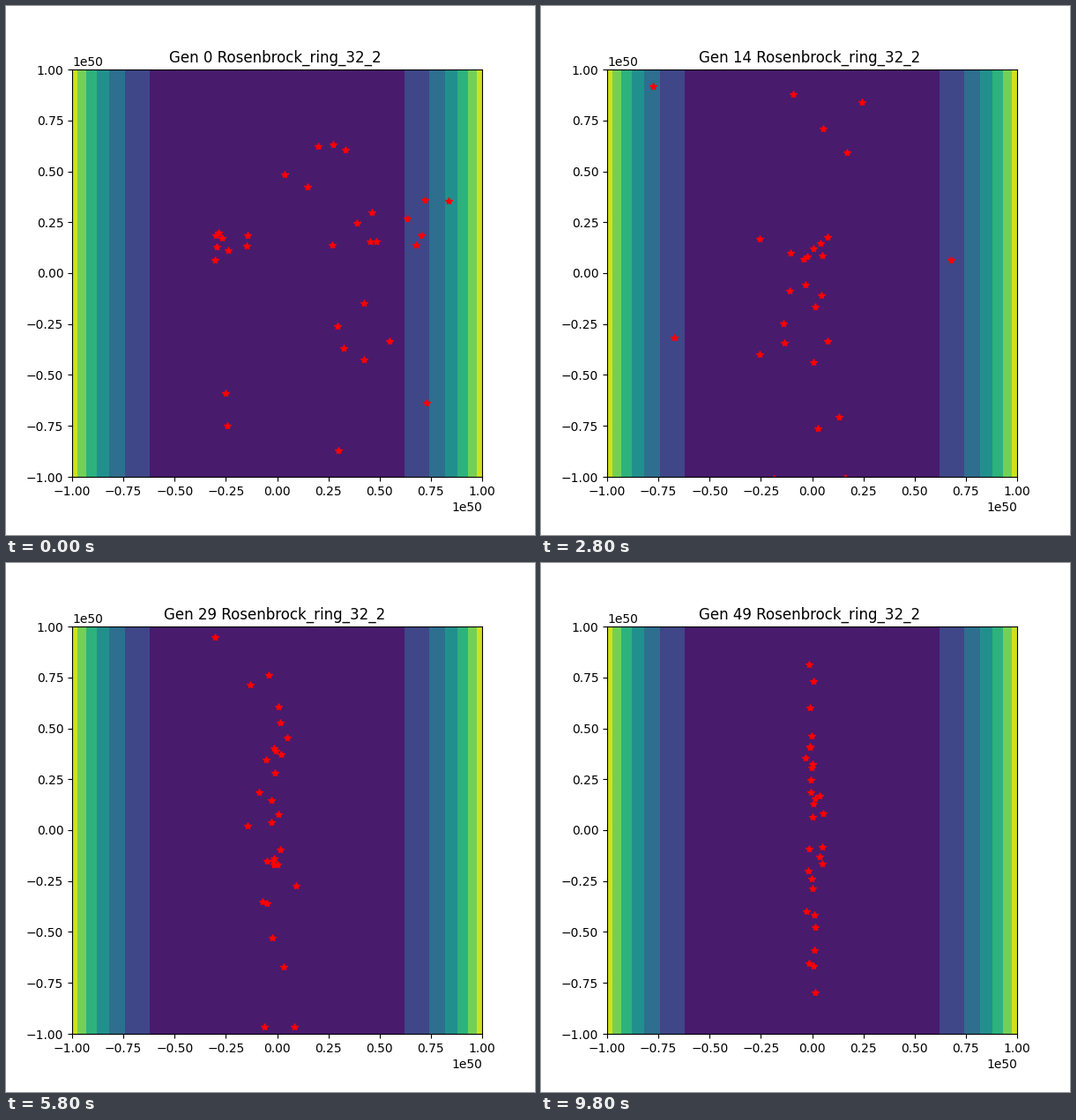
Write a matplotlib script that moves like this. It is 600 by 600 pixels and loops after 10000 ms.

```python
import numpy as np
import matplotlib.pyplot as plt
from matplotlib.animation import FuncAnimation

SCALE = 1e50
GENS = 50
STARS = 32
MOVE_RATE = 0.35

# Groups of the first population: centre x, centre y, number of stars.
GROUPS = [(0.20, 0.57, 5), (-0.25, 0.16, 8), (0.41, 0.20, 6), (0.39, -0.34, 5),
          (0.73, 0.25, 4), (-0.28, -0.65, 2), (0.73, -0.65, 1), (0.30, -0.83, 1)]


def first_population(rng):
    centres = np.repeat([g[:2] for g in GROUPS], [g[2] for g in GROUPS], axis=0)
    return centres + rng.normal(0, 0.08, (STARS, 2))


def trial_spots(rng, gen):
    """Candidate places, drawn ever closer to the valley at x = 0."""
    spread = 0.25 * np.exp(-(gen / 18) ** 2) + 0.013
    return np.column_stack([rng.laplace(0, spread, STARS), rng.normal(0, 0.65, STARS)])


def evolve(seed):
    """Each generation some stars jump to a trial spot and the others rest."""
    rng = np.random.default_rng(seed)
    path = [first_population(rng)]
    for gen in range(1, GENS):
        moved = rng.random((STARS, 1)) < MOVE_RATE
        path.append(np.where(moved, trial_spots(rng, gen), path[-1]))
    return SCALE * np.array(path)


path = evolve(32)

fig, ax = plt.subplots(figsize=(6, 6), dpi=100)
x, y = np.meshgrid(np.linspace(-1, 1, 801), [-1, 1])
ax.contourf(x * SCALE, y * SCALE, x ** 4, levels=0.15 * np.arange(8))
ax.set_xlim(-SCALE, SCALE)
ax.set_ylim(-SCALE, SCALE)
stars, = ax.plot([], [], "r*")
title = ax.set_title("")


def draw(gen):
    stars.set_data(path[gen, :, 0], path[gen, :, 1])
    title.set_text(f"Gen {gen} Rosenbrock_ring_32_2 ")  # trailing space sets the centring
    return stars, title


anim = FuncAnimation(fig, draw, frames=GENS, interval=200, init_func=lambda: draw(0),
                     repeat=True, repeat_delay=0, blit=False)
plt.show()
```
